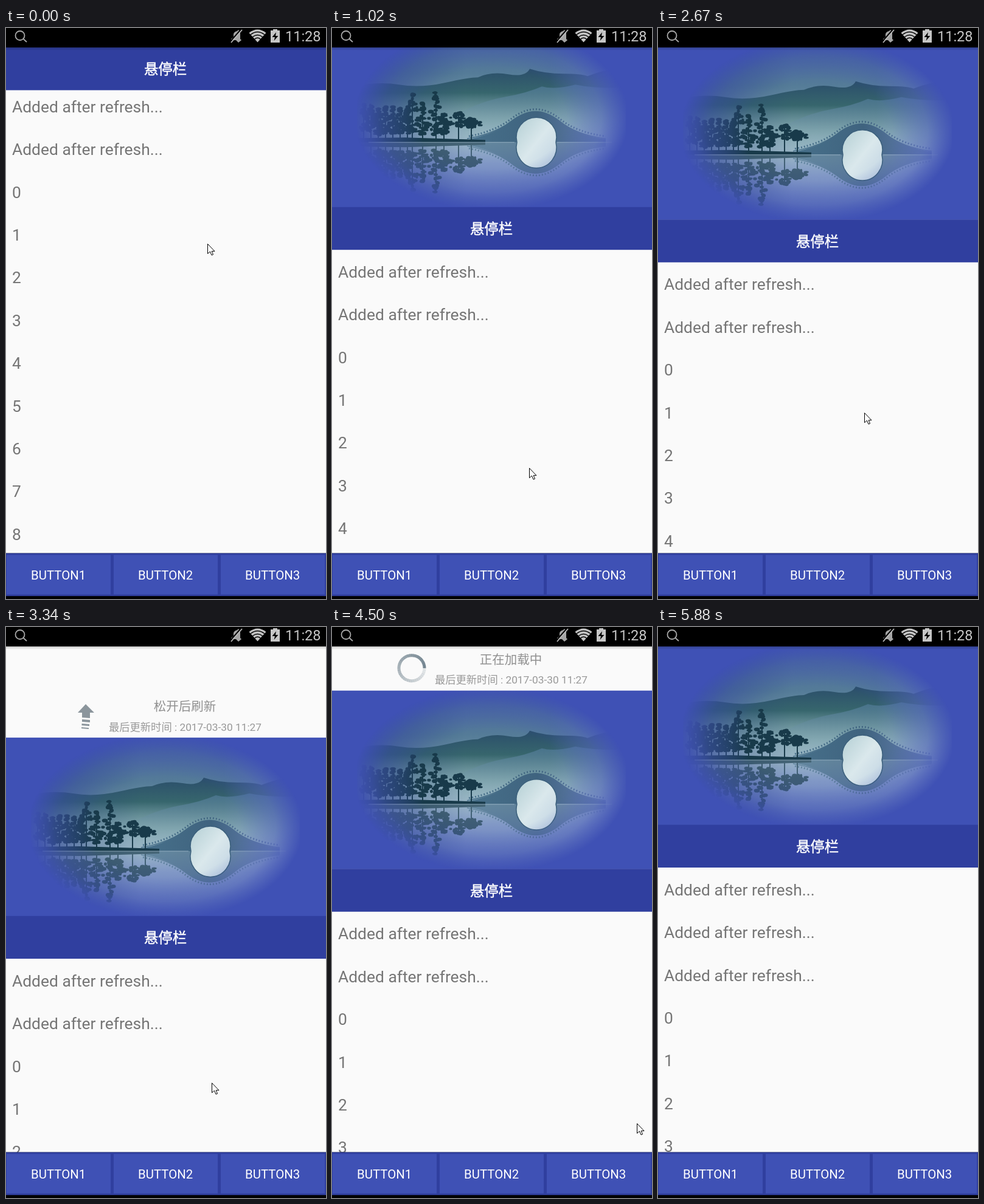
Animation, 526 px wide and 940 px high, one loop 6370 ms. Source, as an HTML page:

```html
<!DOCTYPE html>
<html lang="zh-CN">
<head>
<meta charset="utf-8">
<title>悬停栏</title>
<style>
  html, body { margin: 0; width: 100%; height: 100%; overflow: hidden; background: #000; }
  svg { display: block; width: 526px; height: 940px; font-family: Roboto, "Noto Sans CJK SC", "Noto Sans CJK", sans-serif; }
  .row { font-size: 26.4px; fill: #757575; }
  .mid { text-anchor: middle; }
</style>
</head>
<body>
<svg viewBox="0 0 526 940">
  <defs>
    <linearGradient id="sky" x1="0" y1="0" x2="0" y2="1">
      <stop offset="0" stop-color="#4560a0"/>
      <stop offset=".25" stop-color="#557c98"/>
      <stop offset=".5" stop-color="#86aab4"/>
      <stop offset=".63" stop-color="#9ab6c6"/>
      <stop offset=".75" stop-color="#8198c6"/>
      <stop offset="1" stop-color="#5468b8"/>
    </linearGradient>
    <linearGradient id="far" x1="0" y1="0" x2="0" y2="1">
      <stop offset="0" stop-color="#2b4e6b"/>
      <stop offset=".4" stop-color="#37666d"/>
      <stop offset="1" stop-color="#8fb4b4" stop-opacity="0"/>
    </linearGradient>
    <linearGradient id="near" x1="0" y1="0" x2="0" y2="1">
      <stop offset="0" stop-color="#46718a"/>
      <stop offset="1" stop-color="#93b5bc" stop-opacity=".1"/>
    </linearGradient>
    <linearGradient id="sides">
      <stop offset=".08" stop-color="#24407a" stop-opacity=".6"/>
      <stop offset=".42" stop-color="#24407a" stop-opacity="0"/>
      <stop offset=".68" stop-color="#7183c8" stop-opacity="0"/>
      <stop offset=".9" stop-color="#7183c8" stop-opacity=".6"/>
    </linearGradient>
    <linearGradient id="opening" x1="0" y1="0" x2="1" y2="1">
      <stop offset="0" stop-color="#b4cfd4"/>
      <stop offset=".5" stop-color="#dae8ec"/>
      <stop offset="1" stop-color="#bfd2e2"/>
    </linearGradient>
    <linearGradient id="stone" x1="225" x2="450" y1="0" y2="0" gradientUnits="userSpaceOnUse">
      <stop offset="0" stop-color="#47708a"/>
      <stop offset=".5" stop-color="#3f637f"/>
      <stop offset="1" stop-color="#6a82b8"/>
    </linearGradient>
    <linearGradient id="leaf" x1="45" x2="150" y1="0" y2="0" gradientUnits="userSpaceOnUse">
      <stop offset="0" stop-color="#314b80"/>
      <stop offset="1" stop-color="#183a4a"/>
    </linearGradient>
    <linearGradient id="shade" x1="0" y1="0" x2="0" y2="1">
      <stop offset="0" stop-opacity=".2"/>
      <stop offset="1" stop-opacity="0"/>
    </linearGradient>
    <radialGradient id="fade">
      <stop offset=".55" stop-color="#fff"/>
      <stop offset=".8" stop-color="#aaa"/>
      <stop offset="1" stop-color="#000"/>
    </radialGradient>
    <mask id="vignette"><ellipse cx="262" cy="147" rx="226" ry="153" fill="url(#fade)"/></mask>
    <clipPath id="frame"><rect x="41" width="442" height="293.6"/></clipPath>
  </defs>

  <rect y="32" width="526" height="833" fill="#fafafa"/>
  <g id="list"></g>

  <g id="header">
    <g id="refresh">
      <text id="hint" class="mid" x="294" y="-44" font-size="20.5" fill="#909090"></text>
      <text class="mid" x="294.5" y="-11.5" font-size="17.3" fill="#999">最后更新时间 : 2017-03-30 11:27</text>
      <path id="arrow" fill="#8b959c" d="M131 -55L145 -41H138V-32L125 -33V-41H118ZM125 -30L138 -29V-25L125 -26ZM124.500 -23L137 -22V-19L124.500 -20ZM124 -17L136 -16V-14L124 -15Z"/>
      <g id="spinner"></g>
    </g>
    <rect width="526" height="294" fill="#3f51b5"/>
    <g clip-path="url(#frame)"><g mask="url(#vignette)">
      <rect width="526" height="294" fill="url(#sky)"/>
      <path fill="url(#far)" d="M30 96Q75 86 110 92T185 89T240 80Q262 70 290 75T325 66Q350 74 380 74T420 78Q448 67 470 66L500 76V165H30Z"/>
      <path fill="url(#near)" d="M215 136Q250 118 285 112T345 95Q365 101 400 92Q440 100 500 96V178H215Z"/>
      <rect width="526" height="294" fill="url(#sides)"/>
      <g id="land">
        <path fill="url(#stone)" d="M226 182Q268 173 295 152Q335 119 374 152Q402 175 450 182V187H226Z"/>
        <path fill="none" stroke="url(#stone)" stroke-width="3" stroke-dasharray="2 3" d="M225 177Q268 169 295 148Q335 117 374 148Q402 171 450 177"/>
        <path fill="none" stroke="url(#stone)" stroke-width="1.500" d="M222 181Q268 173 295 152Q335 121 374 152Q402 175 450 181"/>
        <path fill="url(#leaf)" d="M42 180L120 179L252 183V187H42Z"/>
        <g id="trees" fill="url(#leaf)"></g>
      </g>
      <use href="#land" transform="translate(0 374) scale(1 -1)" opacity=".64"/>
      <path id="arch" fill="url(#opening)" stroke="#3c607c" stroke-width="1.500" d="M304 187A33 33 0 1 1 368 187A33 34 0 1 1 304 187Z"/>
      <path stroke="#a7bfd0" stroke-width="1.500" opacity=".5" d="M60 187H300M370 187H460"/>
    </g></g>
  </g>

  <g id="title">
    <rect width="526" height="70.4" fill="#303f9f"/>
    <text class="mid" x="262" y="44.300" font-size="23.4" fill="#fff" stroke="#fff" stroke-width=".5">悬停栏</text>
  </g>
  <rect y="32" width="526" height="5" fill="url(#shade)"/>

  <g id="status">
    <rect width="526" height="32"/>
    <g fill="none" stroke="#aaa" stroke-width="1.800"><circle cx="23" cy="12.500" r="7.500"/><path d="M28.500 18L34 23"/></g>
    <path fill="#a5a5a5" d="M370 18L374 15V10Q375 6 380 5L382 3L384 5L385 8V18L387 20L382 24L378 20H370Z"/>
    <path stroke="#000" stroke-width="2" d="M368 23L386.500 2"/>
    <path stroke="#b8b8b8" stroke-width="1.800" d="M370 24L388 3"/>
    <path fill="#c4c4c4" d="M413.500 23.500L399.500 8Q413.500 -3 427.500 8Z"/>
    <path fill="none" stroke="#000" stroke-width="1.300" d="M402 11Q413.500 2 425 11M405 15Q413.500 8 422 15M408.500 18.500Q413.500 14 418.500 18.500"/>
    <path fill="#c6c6c6" d="M439 2H446V4H450V24H435V4H439Z"/>
    <path d="M444 7L437.500 15H442L440.500 21L447.500 13H443Z"/>
    <text x="517.500" y="22" text-anchor="end" font-size="23.5" fill="#c6c6c6">11:28</text>
  </g>

  <g id="bar">
    <rect y="864.6" width="526" height="76"/>
    <rect y="864.6" width="526" height="70.6" fill="#303f9f"/>
  </g>
  <path id="cursor" fill="#fff" stroke="#000" d="M0 0V16L4 12.500L6.500 18.500L9 17.500L6.700 12H11.500Z"/>
</svg>
<script>
const LOOP = 6370, TOP = 32, PHOTO = 293.6, ROW = 70.4, ROWS = 16;
const REFRESH_START = 3980, REFRESH_END = 5600;

// [time, scroll]; negative values pull the refresh header into view
const scrollKeys = [
  [50, 303], [290, 165], [540, 165], [1020, 31], [1120, 12], [1200, 24],
  [1620, 511.7], [1740, 535], [1880, 535], [2400, 60], [2670, 10.3],
  [2800, 0], [3080, -70], [3340, -150], [3510, -168], [3690, -168],
  [3800, -115], [3980, -72.7], [5600, -72.7], [5700, -40], [5880, 0]
];
// [time, x, y]
const cursorKeys = [
  [50, 331.5, 355.5], [290, 329, 495], [540, 329, 495], [1020, 324.5, 724.5],
  [1120, 326, 740], [1200, 327, 715], [1620, 336.5, 166.5], [1740, 338, 145],
  [1880, 338, 145], [2400, 340, 590], [2670, 339.5, 633.5], [3340, 338.5, 750.5],
  [3510, 340, 785], [3690, 340, 785], [4400, 501.5, 817.5], [5620, 501.5, 817.5], [5800, 530, 830]
];

const $ = id => document.getElementById(id);
const move = (el, x, y) => el.setAttribute("transform", `translate(${x} ${y})`);

function add(parent, tag, attrs, text = "") {
  const el = document.createElementNS("http://www.w3.org/2000/svg", tag);
  for (const name in attrs) el.setAttribute(name, attrs[name]);
  el.textContent = text;
  return parent.appendChild(el);
}

function sample(keys, t, column = 1) {
  const next = keys.findIndex(key => key[0] > t);
  if (next === 0) return keys[0][column];
  if (next < 0) return keys[keys.length - 1][column];
  const a = keys[next - 1], b = keys[next];
  return a[column] + (b[column] - a[column]) * (t - a[0]) / (b[0] - a[0]);
}

let seed = 7;
const random = () => (seed = seed * 16807 % 2147483647) / 2147483647;

// A crown of leaf clumps, widest two thirds of the way down, on a thin trunk.
function tree(x, top, width, crown) {
  let d = `M${x - 1} 183V${top + 2}H${x + 1}V183Z`;
  for (let i = 0; i < 45; i++) {
    const depth = random();
    const spread = width / 2 * Math.sin(Math.PI * depth ** 1.6 * 0.85 + 0.15);
    const rx = 2 + random() * 3, ry = 1.5 + random() * 2;
    const cx = x + (random() * 2 - 1) * spread - rx, cy = top + depth * crown;
    d += `M${cx} ${cy}a${rx} ${ry} 0 1 1 ${2 * rx} 0a${rx} ${ry} 0 1 1 ${-2 * rx} 0`;
  }
  add($("trees"), "path", { d });
}

for (let x = 52; x < 125; x += 12) tree(x, 124 + random() * 8, 18, 44);
tree(132, 108, 24, 62);
tree(149, 122, 20, 52);
tree(171, 105, 24, 70);
tree(184, 140, 20, 34);
tree(208, 137, 42, 24);
tree(229, 146, 34, 16);

for (let i = 0; i < 3; i++) {
  const x = 1 + i * 176;
  add($("bar"), "rect", { x, y: 867.5, width: 171, height: 65, fill: "#3f51b5" });
  add($("bar"), "text", { x: x + 85.2, y: 908, class: "mid", "font-size": 20.4, fill: "#fff" }, `BUTTON${i + 1}`);
}

const SEGMENTS = 40;
for (let i = 0; i < SEGMENTS; i++) {
  const point = k => {
    const angle = -k * 2 * Math.PI / SEGMENTS;
    return `${21 * Math.cos(angle)} ${21 * Math.sin(angle)}`;
  };
  add($("spinner"), "path", {
    d: `M${point(i)}A21 21 0 0 0 ${point(i + 1.1)}`, fill: "none",
    stroke: "#71838e", "stroke-width": 5, opacity: 1 - 0.87 * i / SEGMENTS
  });
}

const rows = Array.from({ length: ROWS }, (_, i) =>
  add($("list"), "text", { x: 10, y: i * ROW + 45.7, class: "row" }));

function draw(t) {
  const scroll = sample(scrollKeys, t);
  const headerY = TOP - scroll;
  const spinning = t >= REFRESH_START;
  const added = t < REFRESH_END ? 2 : 3;
  const armed = scroll < -73;

  move($("header"), 0, headerY);
  move($("title"), 0, Math.max(TOP, headerY + PHOTO));
  move($("list"), 0, headerY + PHOTO + ROW);
  rows.forEach((row, i) => {
    const label = i < added ? "Added after refresh..." : String(i - added);
    if (row.textContent !== label) row.textContent = label;
  });

  $("refresh").style.display = scroll < 0 ? "" : "none";
  $("hint").textContent = spinning ? "正在加载中" : armed ? "松开后刷新" : "下拉刷新";
  $("arrow").style.display = spinning ? "none" : "";
  $("arrow").setAttribute("transform", `rotate(${armed ? 0 : 180} 131.5 -34.5)`);
  $("spinner").style.display = spinning && t < REFRESH_END ? "" : "none";
  $("spinner").setAttribute("transform", `translate(131 -37) rotate(${(t - 4500) * 0.12})`);

  move($("cursor"), sample(cursorKeys, t, 1), sample(cursorKeys, t, 2));
}

const start = performance.now();
function tick() {
  draw((performance.now() - start) % LOOP);
  requestAnimationFrame(tick);
}
tick();
</script>
</body>
</html>
```
